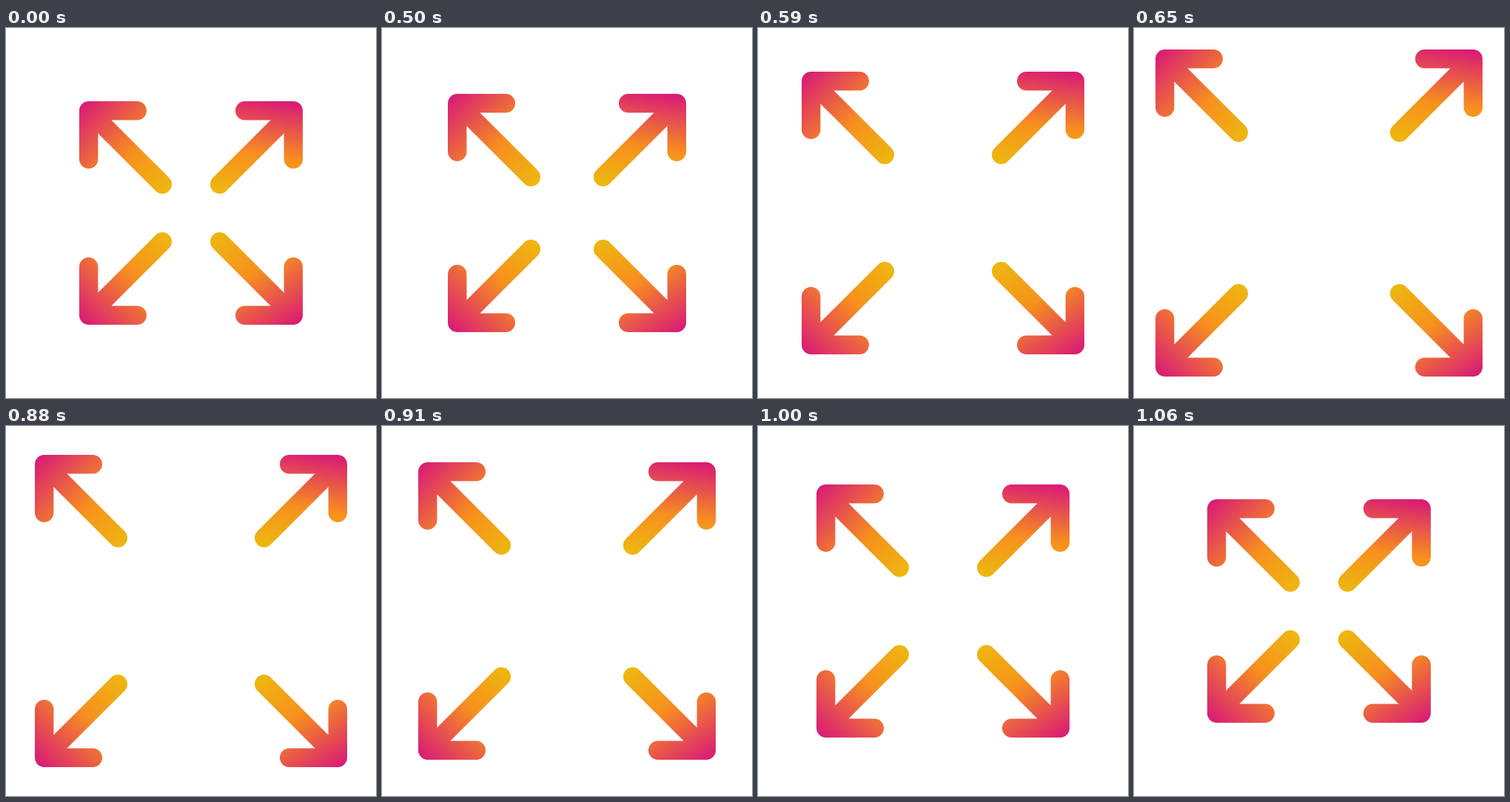
An HTML page for the animation above (1.56 s loop, 500 px wide and 500 px high).

```html
<!DOCTYPE html>
<html lang="en">
<head>
<meta charset="utf-8">
<title>Expanding arrows</title>
<style>
  html, body { margin: 0; width: 100%; height: 100%; overflow: hidden; background: #fff; }
  svg { display: block; width: 100%; height: 100%; }
  path { fill: none; stroke-width: 25.4; stroke-linecap: round; stroke-linejoin: round; }
</style>
</head>
<body>
<svg viewBox="0 0 500 500"></svg>
<script>
const LOOP = 1560, STEP = 30, OUT = 500, BACK = 880, REACH = 70;
const CORNER = 138.3, ARM = 72.7, TAIL = 38.7;
const svg = document.querySelector('svg');

function add(parent, tag, attrs) {
  const el = document.createElementNS('http://www.w3.org/2000/svg', tag);
  for (const [key, value] of Object.entries(attrs)) el.setAttribute(key, value);
  return parent.appendChild(el);
}

// tilt: horizontal share of the gradient axis relative to its vertical share
function makeArrow({ sx, sy, tilt, mid }, i) {
  const x = d => 250 + sx * d, y = d => 250 + sy * d;
  const start = 147, span = 117 * (tilt + 1) / (tilt * tilt + 1);
  const gradient = add(svg, 'linearGradient', {
    id: 'fade' + i, gradientUnits: 'userSpaceOnUse',
    x1: x(start), y1: y(start), x2: x(start - span * tilt), y2: y(start - span)
  });
  [[0, '#d91c75'], [mid, '#f7901e'], [1, '#edb70f']].forEach(([offset, color]) =>
    add(gradient, 'stop', { offset, 'stop-color': color }));
  const el = add(svg, 'path', {
    stroke: `url(#fade${i})`,
    d: `M${x(CORNER)} ${y(ARM)}V${y(CORNER)}H${x(ARM)}` +
       `M${x(CORNER)} ${y(CORNER)}L${x(TAIL)} ${y(TAIL)}`
  });
  return { el, sx, sy };
}

const arrows = [
  { sx: -1, sy: -1, tilt: 1, mid: 0.57 },
  { sx: 1, sy: -1, tilt: 0.15, mid: 0.57 },
  { sx: -1, sy: 1, tilt: 1, mid: 0.57 },
  { sx: 1, sy: 1, tilt: 0.65, mid: 0.55 }
].map(makeArrow);

// Ten-pixel steps; the last outward step jumps straight to full reach.
function shiftAt(t) {
  if (t < OUT) return 0;
  if (t < BACK) {
    const step = Math.floor((t - OUT) / STEP) + 1;
    return step > 5 ? REACH : step * 10;
  }
  return Math.max(0, REACH - 10 * (Math.floor((t - BACK) / STEP) + 1));
}

function render(t) {
  const shift = shiftAt(t);
  for (const { el, sx, sy } of arrows)
    el.setAttribute('transform', `translate(${sx * shift} ${sy * shift})`);
}

let origin;
function tick(now) {
  origin ??= now;
  render((now - origin) % LOOP);
  requestAnimationFrame(tick);
}
render(0);
requestAnimationFrame(tick);
</script>
</body>
</html>
```
